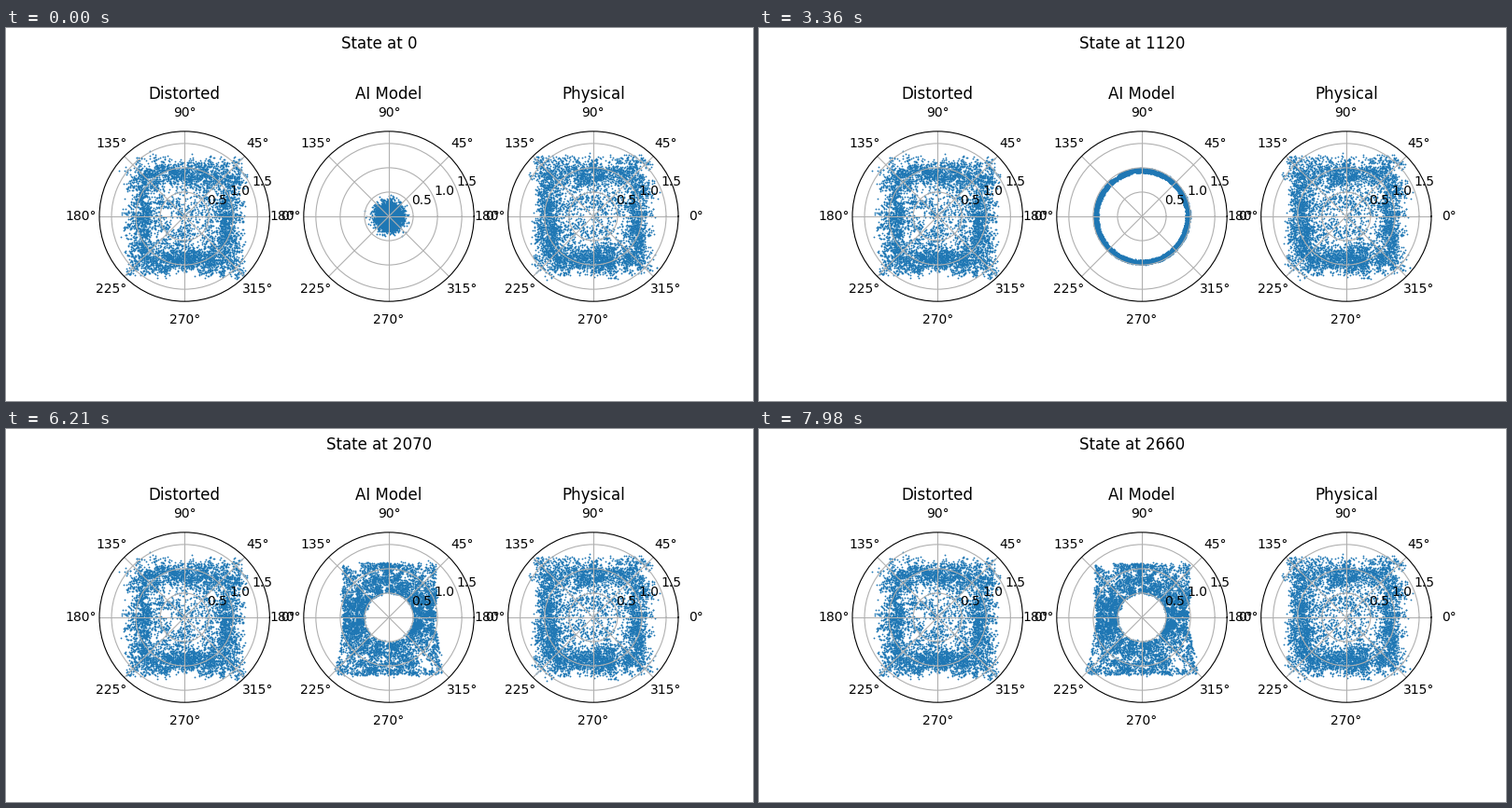
A matplotlib script for the animation above (8 s loop, 800x400 px).

```python
import numpy as np
import matplotlib.pyplot as plt
from matplotlib.animation import FuncAnimation

UNIT = 52.1        # pixels per radial unit
CLUMPS, PER_CLUMP = 1100, 6
COUNT = CLUMPS * PER_CLUMP
TICK = 20          # ms per animation frame
STEP_MS = 30       # ms per model update
DOT = dict(ls="", marker="o", ms=1.3, mew=0, color="#1f77b4")

rng = np.random.default_rng(7)


def clumped(centres, spread):
    """Scatter a few points around every centre."""
    pts = np.repeat(centres, PER_CLUMP, axis=0)
    return pts + rng.normal(0, spread, pts.shape)


def squircle(theta, w, h, power):
    """Polar radius of a rounded box; power 2 gives an ellipse."""
    c, s = np.abs(np.cos(theta)), np.abs(np.sin(theta))
    return ((c / w) ** power + (s / h) ** power) ** (-1 / power)


def polar(theta, r):
    return np.column_stack([r * np.cos(theta), r * np.sin(theta)])


def ease(step, begin, end):
    u = np.clip((step - begin) / (end - begin), 0, 1)
    return u * u * (3 - 2 * u)


def square_cloud(width):
    """Filled square with a denser squarish ring, heavier at the bottom."""
    a = rng.uniform(-np.pi, np.pi, CLUMPS)
    a -= 0.18 * np.cos(a)
    r = squircle(a, width, 46, 8) * rng.normal(1, 0.11, CLUMPS)
    box = rng.uniform(-63, 63, (CLUMPS, 2))
    in_ring = rng.random(CLUMPS) < 0.55
    pts = clumped(np.where(in_ring[:, None], polar(a, r), box), 2.6)
    return pts[np.hypot(*pts.T) < 89]


theta = clumped(rng.uniform(-np.pi, np.pi, CLUMPS), 0.04)
rank = np.abs(clumped(rng.random(CLUMPS), 0.04))
rank = 1 - np.abs(1 - rank)
start = polar(theta, rng.rayleigh(6.2, COUNT))
noise = rng.normal(0, 1, (COUNT, 2))


def model_cloud(step):
    """Blob, then thin ring, then tall box with a hole and a flared base."""
    s = np.sin(theta)
    widen = np.clip((step - 490) / 630, 0, 1)
    tall = ease(step, 1120, 1790)
    flare = ease(step, 1400, 2400)
    ring = 50 + 1.3 * widen
    w = ring + tall * (49 - ring) + flare * s**2 * (15 - 12.5 * s)
    h = ring + tall * (61.5 - 2 * s - ring) - 2 * flare
    inner = 48.3 - 1.3 * widen - 19 * tall - 2 * flare
    outer = squircle(theta, w, h, 2 + 6 * tall + 22 * flare**2)
    fuzz = 0.3 + 0.9 * tall - 0.5 * flare
    target = polar(theta, inner + rank * (outer - inner)) + fuzz * noise
    left = max(0.0, 1 - step / 380) ** 3
    return start * left + target * (1 - left)


def draw_panels(fig):
    """Draw the fixed polar panels once and keep them as a transparent layer."""
    axes = fig.subplots(1, 3, subplot_kw={"projection": "polar"})
    clouds = [square_cloud(45), None, square_cloud(48)]
    for ax, name, pts in zip(axes, ["Distorted", "AI Model", "Physical"], clouds):
        ax.set_facecolor("none")
        ax.set_title(name)
        if pts is not None:
            x, y = pts.T / UNIT
            ax.plot(np.arctan2(y, x), np.hypot(x, y), zorder=1, **DOT)
        ax.set_ylim(0, 1.75)
        ax.set_yticks([0.5, 1.0, 1.5])
    fig.patch.set_visible(False)
    fig.canvas.draw()
    layer = np.array(fig.canvas.buffer_rgba())
    fig.patch.set_visible(True)
    for ax in axes:
        ax.remove()
    return layer


fig = plt.figure(figsize=(8, 4), dpi=100, facecolor="white")
fig.figimage(draw_panels(fig), zorder=1)
stage = fig.add_axes([0, 0, 1, 1], xlim=(-410, 390), ylim=(-198, 202), zorder=0)
stage.axis("off")
dots, = stage.plot([], [], **DOT)
title = fig.suptitle("State at 0")


def update(frame):
    step = (frame * TICK + TICK // 2) // STEP_MS * 10
    dots.set_data(*model_cloud(step).T)
    title.set_text(f"State at {step}")
    return dots, title


anim = FuncAnimation(fig, update, frames=400, interval=TICK,
                     init_func=lambda: update(0), repeat=True, repeat_delay=0)
plt.show()
```
